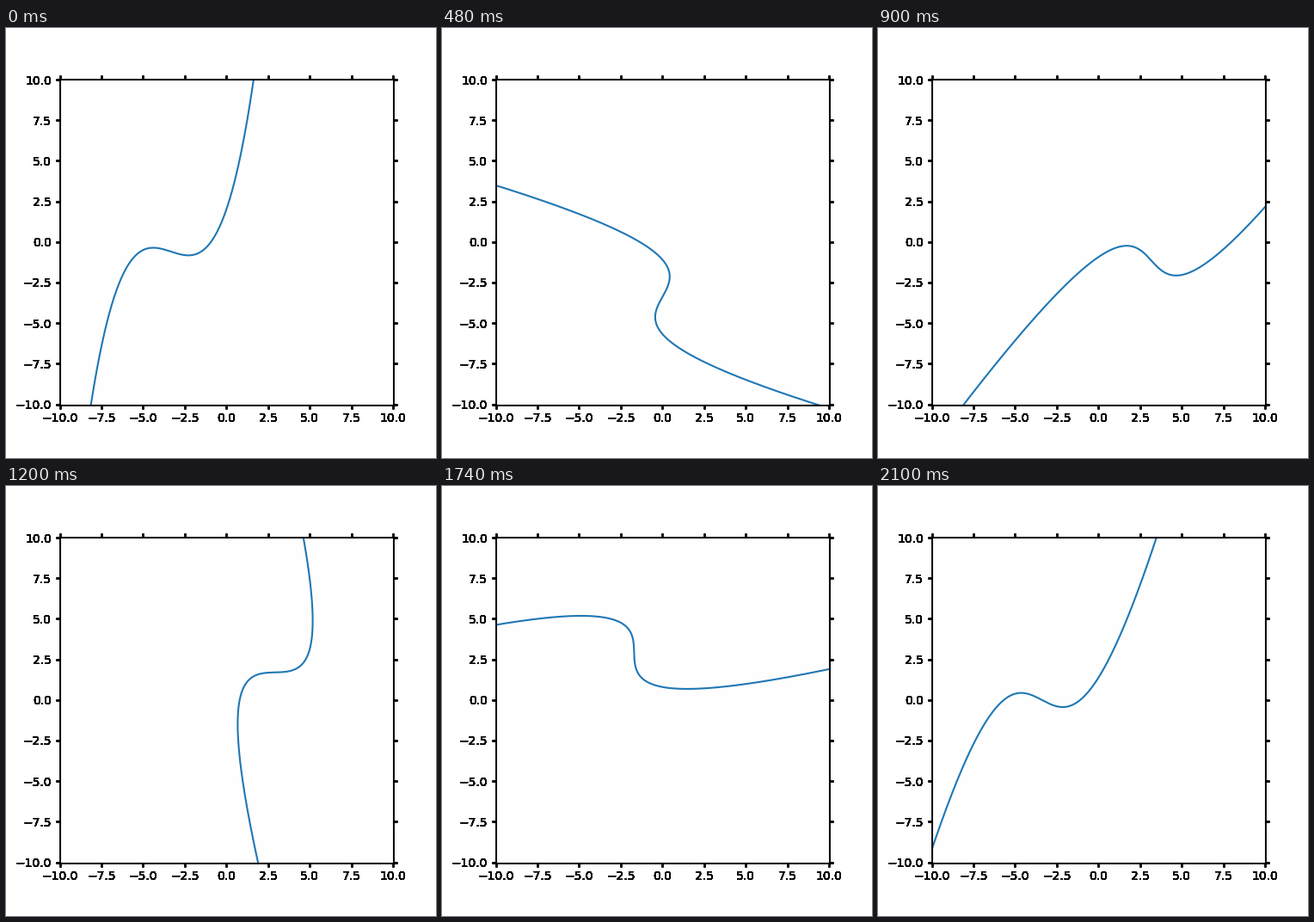
These frames come from a looping animation (500 by 500 pixels, 2.16 s). A matplotlib script:

```python
import numpy as np
import matplotlib.pyplot as plt
from matplotlib.animation import FuncAnimation

FRAMES, INTERVAL = 36, 60
LAYERS = 12  # stacked axes give the heavy, over-inked frame and labels

plt.rcParams.update({"font.family": "DejaVu Sans", "font.size": 10})
fig = plt.figure(figsize=(5, 5), dpi=100, facecolor="white")


def add_axes(width):
    ax = fig.add_axes([0.125, 0.125, 0.775, 0.755], facecolor="#fefefe")
    ax.set(xlim=(-10, 10), ylim=(-10, 10))
    ticks = np.linspace(-10, 10, 9)
    ax.set_xticks(ticks)
    ax.set_yticks(ticks)
    ax.tick_params(top=True, right=True, width=width)
    for spine in ax.spines.values():
        spine.set_linewidth(width)
    return ax


for _ in range(LAYERS - 1):
    add_axes(1.0)
ax = add_axes(0.8)

x = np.linspace(-10, 10, 1000)
y = 0.1 * x**3 + x**2 + 3 * x + 2
curve, = ax.plot([], [], color="#1f77b4", lw=1.5)


def update(i):
    a = 2 * np.pi * i / FRAMES
    c, s = np.cos(a), np.sin(a)
    curve.set_data(c * x - s * y, s * x + c * y)
    return curve,


anim = FuncAnimation(fig, update, frames=FRAMES, interval=INTERVAL, repeat=True)
plt.show()
```
